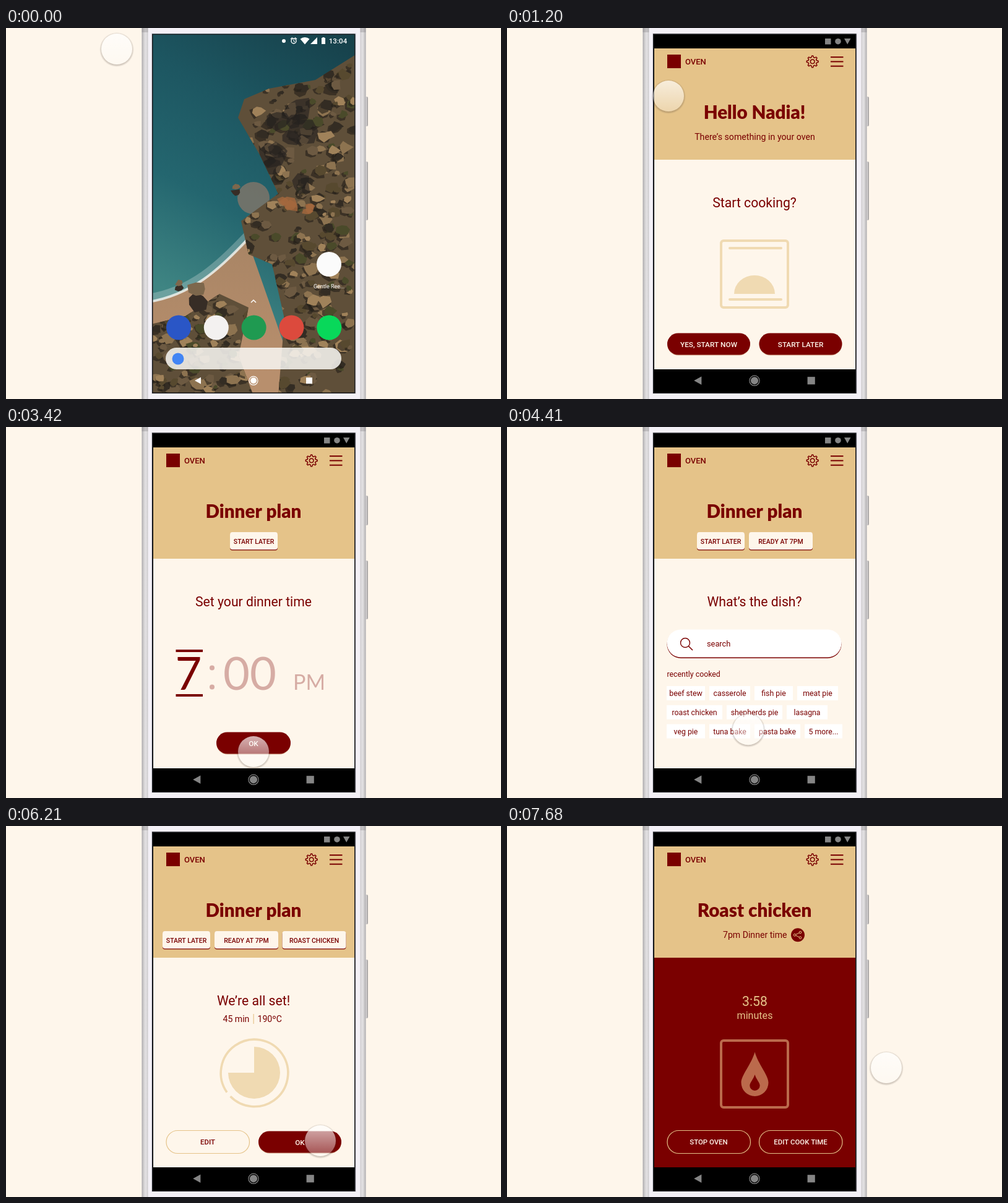
An HTML page with a canvas that plays this animation: 800 by 600 pixels, repeating every 7.71 s.

```html
<!DOCTYPE html>
<html lang="en">
<head>
<meta charset="utf-8">
<title>Kitchen app walkthrough</title>
<style>
html, body { margin: 0; width: 100%; height: 100%; overflow: hidden; background: #fef6eb; }
canvas { display: block; width: 800px; height: 600px; }
</style>
</head>
<body>
<canvas id="stage" width="800" height="600"></canvas>
<script>
const LOOP = 7710, STEP = 30, PAGE = 326, MID = 400, TAU = Math.PI * 2;
const RED = '#7a0000', TAN = '#e5c389', CREAM = '#fef6eb', PALE = '#f0dab2', RUST = '#bb6a4c', GREY = '#858585';
const stage = document.getElementById('stage');
let c = stage.getContext('2d');

const clamp = v => Math.max(0, Math.min(1, v));
const ramp = (t, a, b) => clamp((t - a) / (b - a));
const ease = u => u < .5 ? 4 * u ** 3 : 1 - (2 - 2 * u) ** 3 / 2;
const glide = (t, a, b) => ease(ramp(t, a, b));

let seed = 7;
function rand(lo = 0, hi = 1) {
  seed = (seed * 16807) % 2147483647;
  return lo + (hi - lo) * seed / 2147483647;
}

function text(s, x, y, size, color = RED, weight = 400, align = 'center', face = 'Roboto') {
  c.font = `${weight} ${size}px ${face}, sans-serif`;
  c.textAlign = align;
  c.fillStyle = color;
  c.fillText(s, x, y);
}
function rect(x, y, w, h, color) {
  c.fillStyle = color;
  c.fillRect(x, y, w, h);
}
function round(x, y, w, h, r, fill, stroke, lw = 1) {
  c.beginPath();
  c.roundRect(x, y, w, h, r);
  if (fill) { c.fillStyle = fill; c.fill(); }
  if (stroke) { c.strokeStyle = stroke; c.lineWidth = lw; c.stroke(); }
}
function disc(x, y, r, color) {
  c.beginPath();
  c.arc(x, y, r, 0, TAU);
  c.fillStyle = color;
  c.fill();
}
function ring(x, y, r, color, lw, from = 0, to = TAU) {
  c.beginPath();
  c.arc(x, y, r, from, to);
  c.strokeStyle = color;
  c.lineWidth = lw;
  c.stroke();
}
function poly(color, ...pts) {
  c.beginPath();
  pts.forEach(p => c.lineTo(...p));
  c.closePath();
  c.fillStyle = color;
  c.fill();
}
function line(color, lw, ...pts) {
  c.beginPath();
  pts.forEach(p => c.lineTo(...p));
  c.strokeStyle = color;
  c.lineWidth = lw;
  c.stroke();
}
function chevron(x, y, w, color) {
  line(color, 1.5, [x - w, y + w], [x, y], [x + w, y + w]);
}
function fade(alpha, draw) {
  if (alpha <= 0) return;
  c.save();
  c.globalAlpha *= alpha;
  draw();
  c.restore();
}
function gradient(x0, y0, x1, y1, ...colors) {
  const g = c.createLinearGradient(x0, y0, x1, y1);
  colors.forEach((k, i) => g.addColorStop(i / (colors.length - 1), k));
  return g;
}

// Coast seen from above: sea, sand, and land strewn with random facets
function facet(x, y, r, color) {
  const pts = [];
  for (let i = 0; i < 7; i++) {
    const a = i / 7 * TAU, d = r * rand(.6, 1.2);
    pts.push([x + d * Math.cos(a), y + d * .8 * Math.sin(a)]);
  }
  poly(color, ...pts);
}
function rocks(count, x0, x1, y0, y1) {
  const tones = ['#8d7350', '#a0825a', '#6d5a42', '#57492f', '#4a4a2a', '#332c23'];
  for (let i = 0; i < count; i++) {
    const x = rand(x0, x1), y = rand(y0, y1), r = rand(4, 13);
    facet(x - 3, y + 3, r, 'rgba(35,30,24,.6)');
    facet(x, y, r, tones[Math.floor(rand(0, tones.length))]);
  }
}
function land(draw, ...shore) {
  c.save();
  poly('#5f4f39', ...shore);
  c.clip();
  draw();
  c.restore();
}
function shore(color, lw, shift) {
  c.beginPath();
  c.moveTo(230, 443 + shift);
  c.bezierCurveTo(300, 432 + shift, 345, 390 + shift, 390, 342 + shift);
  c.strokeStyle = color;
  c.lineWidth = lw;
  c.stroke();
}
function coast() {
  rect(236, 9, 329, 582, gradient(520, 10, 290, 440, '#17424c', '#1d5661', '#24666f', '#3f8583'));
  c.beginPath();
  c.moveTo(230, 444);
  c.bezierCurveTo(300, 432, 345, 390, 390, 342);
  c.lineTo(480, 600);
  c.lineTo(230, 600);
  c.fillStyle = gradient(0, 350, 0, 560, '#a98565', '#b88f6d');
  c.fill();
  shore('rgba(215,225,220,.3)', 14, -6);
  shore('rgba(245,245,240,.8)', 4, 0);
  disc(400, 275, 26, 'rgba(130,118,106,.8)');

  land(() => {
    rocks(320, 376, 565, 40, 591);
    for (let i = 0; i < 9; i++) facet(rand(425, 490), rand(120, 265), rand(16, 28), 'rgba(35,33,30,.6)');
    for (let i = 0; i < 6; i++) facet(rand(430, 510), rand(278, 298), rand(6, 14), 'rgba(165,104,62,.8)');
  }, [570, 40], [500, 84], [425, 98], [385, 115], [375, 145], [410, 205], [440, 268],
    [380, 312], [392, 366], [430, 382], [450, 470], [440, 595], [570, 595]);
  land(() => rocks(110, 238, 400, 430, 591),
    [230, 480], [290, 466], [345, 430], [392, 452], [376, 530], [400, 595], [230, 595]);
  for (const [x, y, r] of [[372, 260, 9], [310, 428, 20], [280, 415, 8]]) {
    facet(x, y + r * .7, r, '#372d26');
    facet(x, y - r * .3, r * .8, '#7d674c');
  }
}

function home() {
  c.drawImage(wallpaper, 0, 0);
  disc(449, 21, 3, '#fff');
  ring(465, 21, 4, '#fff', 1.4);
  line('#fff', 1.1, [465, 18.5], [465, 21.2], [467, 22.5]);
  for (const s of [-1, 1]) line('#fff', 1.4, [465 + 5 * s, 18], [465 + 2 * s, 15.5]);
  c.beginPath();
  c.moveTo(483, 26.5);
  c.arc(483, 26.5, 11.5, -2.28, -.86);
  c.fillStyle = '#fff';
  c.fill();
  poly('#fff', [492, 26], [503, 26], [503, 15]);
  rect(510, 16, 6, 10, '#fff');
  rect(511.5, 15, 3, 1, '#fff');
  text('13:04', 536.5, 25, 11.6, '#fff', 500);

  disc(522, 382, 20, '#fbfbfb');
  text('Gentle Ree...', 522, 421, 9, '#fff');
  chevron(MID, 440, 4, '#fff');
  ['#2a56c6', '#f3f1f0', '#1f9a51', '#dc4a3d', '#08d85a'].forEach((k, i) => disc(279 + i * 60.8, 484.5, 20, k));
  round(258, 517, 284, 35, 17.5, 'rgba(250,248,245,.85)');
  disc(278, 535, 9.5, '#4285f4');
  navKeys(310, 490, '#fff', 5);
}

function navKeys(left, right, color, r) {
  poly(color, [left - r, 570.3], [left + r, 570.3 - r * 1.1], [left + r, 570.3 + r * 1.1]);
  disc(MID, 570.3, r, color);
  ring(MID, 570.3, r + 2, color, 1.2);
  rect(right - r, 570.3 - r, r * 2, r * 2, color);
}

function notice(p) {
  if (p <= 0) return;
  c.save();
  c.translate(0, -122 * (1 - p));
  rect(236, 9, 329, 3, '#202428');
  rect(237, 12, 327, 73, '#fff');
  rect(237, 85, 327, 44, TAN);
  disc(256.5, 31, 5.5, '#b81f12');
  text('My Cook', 269, 34.5, 9.3, '#222', 400, 'left');
  text('• now', 309, 34.5, 9.3, '#777', 400, 'left');
  chevron(338.8, 29.7, 2.8, '#a31515');
  text('Start cooking?', 250, 53.5, 11.1, '#222', 400, 'left');
  text('Something’s in the oven.', 249.5, 69.5, 11, '#757575', 400, 'left');
  disc(535, 60, 16, '#cbcbcb');
  text('YES, SET UP', 252, 111, 11.1, RED, 500, 'left');
  text('NO, REMIND ME LATER', 360.5, 111, 11, RED, 500, 'left');
  c.restore();
}

const title = s => text(s, MID, 147, 29.6, RED, 900, 'center', 'Lato');
const heading = s => text(s, MID, 290, 21.2);
const clock = (s, x, size = 74) => text(s, x, 425, size, RED, 400, 'center', 'Lato');

function button(x, w, label) {
  round(x, 494, w, 35.5, 18, 'rgba(190,130,90,.6)');
  round(x, 493.5, w, 35, 17.5, RED);
  text(label, x + w / 2, 515.5, 11.8, CREAM, 500);
}
function outline(x, label, color) {
  round(x + .5, 492.5, 134.5, 37, 18.5, null, TAN, 1.2);
  text(label, x + 67.5, 514.5, 11.4, color, 500);
}

function askPage(t) {
  heading('Start cooking?');
  round(346, 344, 108, 108, 4, null, PALE, 4);
  for (const y of [354, 437]) round(358, y, 87, 4, 2, PALE);
  c.beginPath();
  c.ellipse(MID, 430, 33, 30, 0, Math.PI, 0);
  c.fillStyle = PALE;
  c.fill();
  fade(1 - ramp(t, 2080, 2230), () => {
    button(259, 134, 'YES, START NOW');
    button(407.5, 134, 'START LATER');
  });
}

function timePage() {
  heading('Set your dinner time');
  for (const y of [360, 432]) rect(274.5, y, 43.5, 4, RED);
  clock('7', 295);
  fade(.3, () => {
    for (const y of [389.5, 420.5]) disc(333, y, 4, RED);
    clock('00', 394);
    clock('PM', 490, 34);
  });
  button(340, 120, 'OK');
}

const dishes = [
  ['beef stew', 62, 'casserole', 66, 'fish pie', 62, 'meat pie', 66],
  ['roast chicken', 90, 'shepherds pie', 90, 'lasagna', 66],
  ['veg pie', 62, 'tuna bake', 66, 'pasta bake', 74, '5 more...', 61]
];
function dishPage() {
  heading('What’s the dish?');
  round(258.5, 329, 282, 45, 22.5, RED);
  round(258.5, 327.5, 282, 45, 22.5, '#fff');
  ring(288, 349, 7.5, RED, 1.4);
  line(RED, 1.6, [293.5, 354.5], [300, 361]);
  text('search', 323, 354.5, 12.8, RED, 400, 'left');
  text('recently cooked', 258.5, 404, 12.3, RED, 400, 'left');
  dishes.forEach((row, n) => {
    const y = 419 + n * 30.8;
    let x = 258;
    for (let i = 0; i < row.length; i += 2) {
      const w = row[i + 1];
      rect(x, y, w, 23, '#fff');
      text(row[i], x + w / 2, y + 16, 12.3);
      x += w + 7;
    }
  });
}

function readyPage() {
  heading('We’re all set!');
  text('45 min', 350.5, 316.5, 14.1, RED, 400, 'left');
  rect(399.5, 304, 1.2, 16, TAN);
  text('190ºC', 406.5, 316.5, 14.1, RED, 400, 'left');
  ring(401.5, 399.5, 54.3, PALE, 3.6, 2.53, 2.37 + TAU);
  c.beginPath();
  c.moveTo(401, 399);
  c.arc(401, 399, 42, -Math.PI / 2, Math.PI);
  c.fillStyle = PALE;
  c.fill();
  outline(258.5, 'EDIT', RED);
  button(408, 134, 'OK');
}

function drop(x, top, bottom, r, color) {
  const y = bottom - r, neck = top + (y - top) * .4, hip = y - r * .55;
  c.beginPath();
  c.moveTo(x, top);
  c.bezierCurveTo(x + r * .25, neck, x + r, hip, x + r, y);
  c.arc(x, y, r, 0, Math.PI);
  c.bezierCurveTo(x - r, hip, x - r * .25, neck, x, top);
  c.fillStyle = color;
  c.fill();
}

function cooking(t) {
  rect(238, 213, 325, 339, RED);
  const left = 239 - Math.floor(Math.max(0, t - 6450) / 1000);
  text(`${Math.floor(left / 60)}:${String(left % 60).padStart(2, '0')}`, 400.5, 290.5, 21.2, TAN);
  text('minutes', 400.5, 312, 16.1, TAN);
  round(346, 347, 108, 108, 4, null, RUST, 4);
  drop(400.5, 365.5, 437, 22, RUST);
  drop(400.5, 402, 428, 8.2, RED);
  outline(258.5, 'STOP OVEN', CREAM);
  outline(407, 'EDIT COOK TIME', CREAM);
}

function tag(x, w, label, alpha) {
  fade(alpha, () => {
    round(x, 171, w, 28.5, 4, RED);
    round(x, 170, w, 28.2, 4, CREAM);
    text(label, x + w / 2, 189, 10.5, RED, 500);
  });
}

function gear(x, y) {
  c.beginPath();
  for (let i = 0; i < 32; i++) {
    const a = (i + .5) / 32 * TAU, r = (i + 1) % 4 < 2 ? 9.4 : 6.8;
    c.lineTo(x + r * Math.cos(a), y + r * Math.sin(a));
  }
  c.closePath();
  c.strokeStyle = RED;
  c.lineWidth = 1.5;
  c.stroke();
  ring(x, y, 3.3, RED, 1.5);
}

function share(x, y) {
  const ends = [[x + 4, y - 4.3], [x - 5, y], [x + 4, y + 4.3]];
  disc(x, y, 11, RED);
  line(TAN, 1, ...ends);
  for (const p of ends) {
    disc(...p, 2, RED);
    ring(...p, 1.8, TAN, 1);
  }
}

function header(t, done) {
  rect(238, 33, 325, 180, TAN);
  rect(259, 43, 22, 22, RED);
  text('OVEN', 288, 59, 13, RED, 500, 'left');
  gear(493.7, 54.3);
  for (let i = 0; i < 3; i++) rect(523, 46.1 + i * 7.3, 20.5, 2, RED);

  fade(1 - ramp(t, 2100, 2280), () => {
    title('Hello Nadia!');
    text('There’s something in your oven', 400.5, 181, 14.2);
  });
  fade(ramp(t, 2300, 2600) * (1 - done), () => {
    title('Dinner plan');
    const x = 362 - 55 * glide(t, 3550, 3950) - 54 * glide(t, 4950, 5350);
    tag(x, 77, 'START LATER', 1);
    tag(x + 84, 103, 'READY AT 7PM', ramp(t, 3700, 4000));
    tag(x + 193.5, 103, 'ROAST CHICKEN', ramp(t, 5100, 5400));
  });
  fade(done, () => {
    title('Roast chicken');
    text('7pm Dinner time', 349, 181, 14.1, RED, 400, 'left');
    share(470, 176.3);
  });
}

function app(t) {
  rect(236, 9, 329, 582, '#000');
  rect(238, 213, 325, 339, CREAM);
  const done = ramp(t, 6300, 6600);
  header(t, done);
  const scroll = PAGE * (glide(t, 2187, 2687) + glide(t, 3500, 4000) + glide(t, 4900, 5400));
  c.save();
  c.beginPath();
  c.rect(237, 213, 326, 339);
  c.clip();
  [askPage, timePage, dishPage, readyPage].forEach((draw, i) => {
    const dx = i * PAGE - scroll;
    if (Math.abs(dx) >= PAGE) return;
    c.save();
    c.translate(dx, 0);
    draw(t);
    c.restore();
  });
  fade(done, () => cooking(t));
  c.restore();

  rect(514, 17, 9.5, 9.5, GREY);
  disc(535, 21.7, 4.8, GREY);
  poly(GREY, [545, 17], [555.5, 17], [550.2, 26.5]);
  navKeys(308.3, 491.7, GREY, 6.1);
}

function phone() {
  rect(0, 0, 800, 600, CREAM);
  for (const [y, h] of [[111, 48], [216, 95]])
    round(579, y, 6, h, 2, gradient(580, 0, 585, 0, '#e8e6e6', '#cfcccc', '#989595'));
  rect(219.5, 0, 362, 600, '#f3f0f6');
  for (const [outer, inner] of [[219.5, 229.5], [581.5, 572.5]]) {
    const x = Math.min(outer, inner), w = Math.abs(outer - inner);
    rect(x, 0, w, 600, gradient(outer, 0, inner, 0, '#a9a7a8', '#d4d2d3', '#e4e2e4', '#c9c7c9'));
    rect(x, 0, w, 7, 'rgba(120,118,120,.3)');
  }
  rect(235, 8.5, 331, 583, '#d9d5df');
}

// start, end, x, y, sideways bend
const moves = [
  [520, 880, 261, 110, 0],
  [1350, 1900, 474, 515, 0],
  [2200, 2600, 400, 525, 0],
  [4214, 4714, 303, 465, .6],
  [5450, 5980, 508, 509, 0],
  [6960, 7660, 613, 391, 1.3]
];
function pointerAt(t) {
  let x = 179, y = 34;
  for (const [a, b, toX, toY, bend] of moves) {
    const p = glide(t, a, b), dx = toX - x, dy = toY - y, side = 2 * p * (1 - p) * bend;
    x += dx * p - dy * side;
    y += dy * p + dx * side;
    if (p < 1) break;
  }
  return [x, y];
}
function pointer(t) {
  const [x, y] = pointerAt(t);
  const shade = c.createRadialGradient(x, y + 1, 24, x, y + 1, 28);
  shade.addColorStop(0, 'rgba(70,55,45,.3)');
  shade.addColorStop(1, 'rgba(70,55,45,0)');
  c.beginPath();
  c.arc(x, y + 1, 28, 0, TAU);
  c.moveTo(x + 25, y);
  c.arc(x, y, 25, 0, TAU);
  c.fillStyle = shade;
  c.fill('evenodd');
  disc(x, y, 25, gradient(0, y - 25, 0, y + 25, 'rgba(255,255,255,.7)', 'rgba(255,255,255,.3)'));
}

function render(t) {
  phone();
  c.save();
  c.beginPath();
  c.rect(236, 9.5, 328.5, 581.5);
  c.clip();
  const open = ramp(t, 1000, 1150);
  if (open < 1) {
    home();
    notice(glide(t, 90, 480));
  }
  fade(open, () => app(t));
  c.strokeStyle = '#17191c';
  c.lineWidth = 1.5;
  c.strokeRect(236.75, 10.2, 327, 580);
  c.restore();
  pointer(t);
}

const wallpaper = document.createElement('canvas');
wallpaper.width = 800;
wallpaper.height = 600;
const screen2d = c;
c = wallpaper.getContext('2d');
coast();
c = screen2d;

const start = performance.now();
function tick() {
  const t = (performance.now() - start) % LOOP;
  render(Math.floor(t / STEP) * STEP);
  requestAnimationFrame(tick);
}
tick();
</script>
</body>
</html>
```
